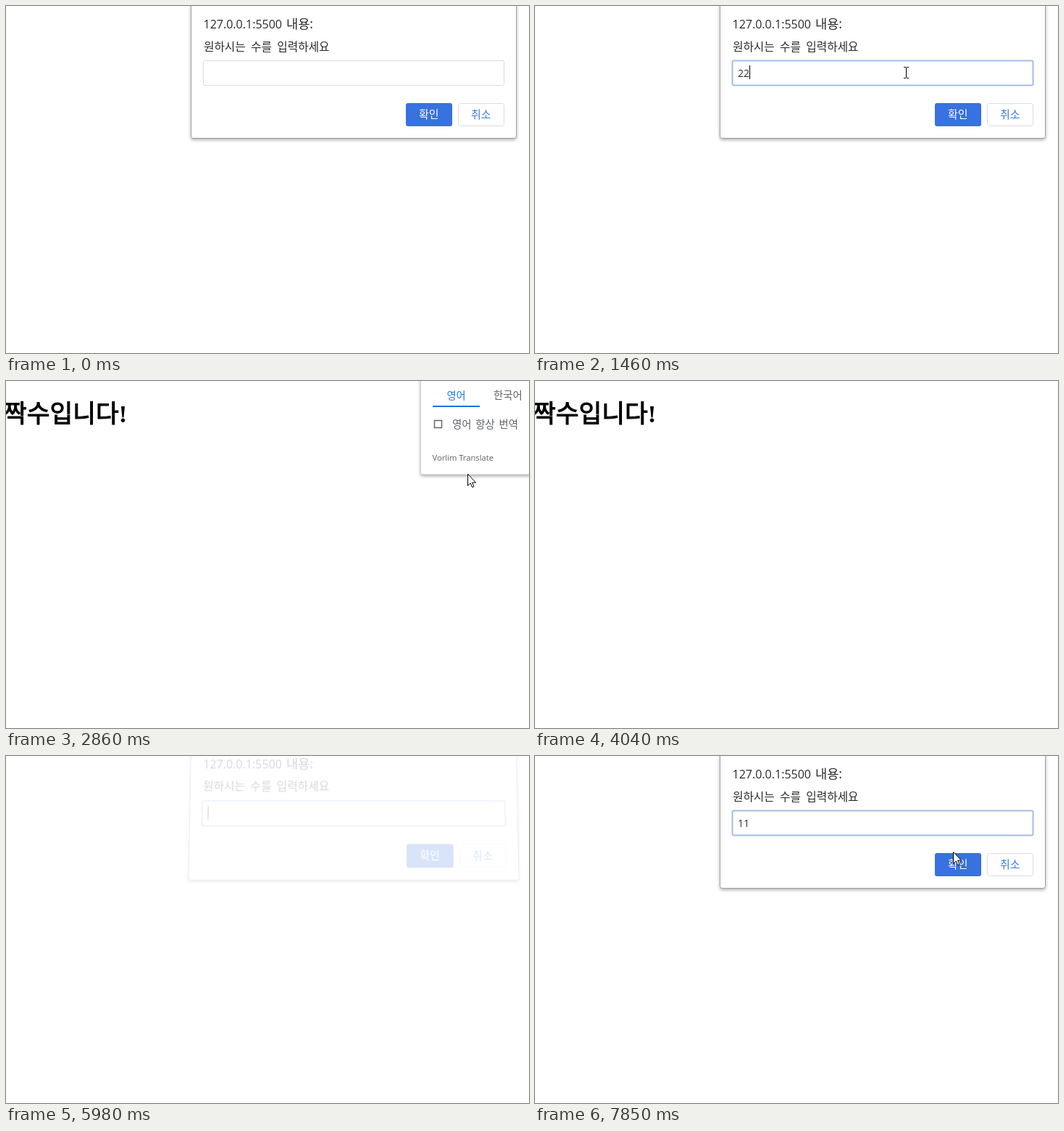
An HTML page that plays this animation: 722 px wide and 479 px high, repeating every 8 s.

```html
<!DOCTYPE html>
<html lang="ko">
<head>
<meta charset="utf-8">
<title>짝수 홀수</title>
<style>
  html, body { margin: 0; width: 100%; height: 100%; overflow: hidden; background: #fff; }
  #stage { position: fixed; inset: 0; overflow: clip; contain: strict; }
  svg { position: absolute; left: 0; top: 0; width: 100%; height: 100%; }
  text { font-family: 'Open Sans', 'Noto Sans CJK KR', 'Noto Sans CJK', sans-serif; fill: #2b2b2b; }
  #heading text { font: 34.5px 'Liberation Serif', 'Noto Sans CJK KR', 'Noto Sans CJK', serif; fill: #000; stroke: #000; stroke-width: 1.1px; }
  #heading tspan { font-weight: 700; stroke: none; }
  #dialog { transform-origin: 480px 12px; }
  .panel { fill: #fff; filter: drop-shadow(0 2px 2px rgba(0, 0, 0, .32)); }
  .button { font-size: 15px; }
  #popup text { fill: #5f6368; }
</style>
</head>
<body>
<div id="stage">
<svg id="heading"><text x="-3" y="57">짝수입니다<tspan>!</tspan></text></svg>

<svg id="dialog">
  <rect class="panel" x="255.5" y="-20" width="449" height="202.5" rx="3" stroke="#a2a2a2"/>
  <text x="272.5" y="31" font-size="16">127.0.0.1:5500</text>
  <text x="387" y="31" font-size="17.6">내용:</text>
  <text x="273" y="61.5" font-size="15.7" word-spacing="3.3">원하시는 수를 입력하세요</text>
  <rect id="field" x="272.5" y="75.5" width="415" height="34" rx="2" fill="#fff"/>
  <text id="value" x="280" y="98" font-size="14"></text>
  <path id="caret" d="M.5 82V101" stroke="#000"/>
  <rect x="552" y="134" width="64" height="32" rx="3" fill="#3871e0"/>
  <text class="button" x="570" y="155" style="fill:#fff">확인</text>
  <rect x="624.5" y="134.5" width="63" height="31" rx="3" fill="#fff" stroke="#dadce0"/>
  <text class="button" x="642" y="155" style="fill:#3c7bdc">취소</text>
</svg>

<svg id="popup">
  <rect class="panel" x="572.5" y="-20" width="160" height="149" rx="3" stroke="#d0d0d0"/>
  <text x="608.5" y="25" font-size="14.2" style="fill:#1a73e8">영어</text>
  <text x="673" y="25" font-size="14.4">한국어</text>
  <path d="M589 35H654" stroke="#1a73e8" stroke-width="2"/>
  <rect x="591.5" y="54.5" width="10" height="10" fill="none" stroke="#5f6368" stroke-width="1.5"/>
  <text x="616" y="65" font-size="14.4" word-spacing="2">영어 항상 번역</text>
  <text x="588.5" y="110" font-size="11.2">Vorlim Translate</text>
</svg>

<svg id="pointer">
  <g id="cursor">
    <path id="arrow" d="M.5 .5V16.5L4.2 13L6.7 18.7L9 17.7L6.6 12.2H11.6Z" fill="#fff" stroke="#000"/>
    <path id="beam" d="M-3 -7.5H0M1 -7.5H4M.5 -7V7M-3 7.5H0M1 7.5H4" fill="none" stroke="#000"/>
  </g>
</svg>
</div>

<script>
const LOOP = 8000, CLOSE = 2240, ANSWER = 2320, DISMISS = 3570, REOPEN = 5980;
const KEY_GAP = 150, BLINK = 500;

// Stops of the pointer: [time, x, y]; it is hidden between visits.
const visits = [
  { until: DISMISS, stops: [[70, 600, 277], [850, 512, 92], [1860, 512, 92], [2200, 573, 145],
    [2700, 573, 145], [3020, 699, 111]] },
  { until: 4040, stops: [[3890, 676, 370], [4040, 685, 479]] },
  { until: 5760, stops: [[4900, 560, 465], [5280, 256, 58], [5660, 717, 444]] },
  { until: LOOP, stops: [[6200, 690, 353], [6520, 448, 117], [6760, 489, 92], [7610, 489, 92],
    [7850, 577, 132]] }
];
const rounds = [
  { digit: '2', focus: 580, type: 1310, end: CLOSE },
  { digit: '1', focus: REOPEN, type: 7060, end: LOOP }
];

const $ = id => document.getElementById(id);
const show = (id, on) => $(id).style.display = on ? '' : 'none';
const ramp = (t, from, to) => Math.min(1, Math.max(0, (t - from) / (to - from)));
const smooth = u => u * u * (3 - 2 * u);
const mix = (a, b, u) => a + (b - a) * u;

function pointerAt(t) {
  const visit = visits.find(v => t >= v.stops[0][0] && t < v.until);
  return visit && visit.stops.reduce(([t0, x0, y0], [t1, x1, y1]) => {
    const u = smooth(ramp(t, t0, t1));
    return [t1, mix(x0, x1, u), mix(y0, y1, u)];
  }).slice(1).map(Math.round);
}

function drawPointer(t, dialogOpen) {
  const spot = pointerAt(t);
  show('pointer', spot);
  if (!spot) return;
  const [x, y] = spot;
  const overField = dialogOpen && x > 272 && x < 688 && y > 75 && y < 110;
  show('arrow', !overField);
  show('beam', overField);
  $('cursor').setAttribute('transform', `translate(${x} ${y})`);
}

// The window leaves upwards while leaning back, and returns the same way.
function dialogPose(t) {
  if (t < REOPEN) {
    const u = ramp(t, CLOSE, CLOSE + 320);
    return [1 - smooth(u), 1 - (1 - u) ** 3.5];
  }
  const u = ramp(t, REOPEN, REOPEN + 180);
  return [mix(.19, 1, u), (1 - u) ** 2];
}

function drawDialog(opacity, tilt) {
  const lean = (-9.3e-5 * tilt).toFixed(8);
  $('dialog').style.opacity = opacity;
  $('dialog').style.transform = tilt
    ? `translateY(${-14 * tilt}px) matrix3d(1,0,0,0, 0,1,0,${lean}, 0,0,1,0, 0,0,0,1)`
    : 'none';
}

function drawField(t) {
  const { digit, focus, type, end } = rounds[t < REOPEN ? 0 : 1];
  const focused = t >= focus && t < end;
  const count = (t >= type) + (t >= type + KEY_GAP);
  const lastAction = count ? type + (count - 1) * KEY_GAP : focus;
  $('value').textContent = digit.repeat(count);
  show('caret', focused && (t - lastAction) % (2 * BLINK) < BLINK);
  $('caret').setAttribute('transform', `translate(${280 + 8 * count} 0)`);
  $('field').setAttribute('stroke', focused ? '#a3bde8' : '#dadada');
  $('field').setAttribute('stroke-width', focused ? 2 : 1);
}

function draw() {
  const t = performance.now() % LOOP;
  const [opacity, tilt] = dialogPose(t);
  show('heading', t >= ANSWER && t < REOPEN);
  $('popup').style.opacity = t < DISMISS ? smooth(ramp(t, CLOSE, CLOSE + 320)) : 0;
  drawDialog(opacity, tilt);
  drawField(t);
  drawPointer(t, opacity === 1);
  requestAnimationFrame(draw);
}
draw();
</script>
</body>
</html>
```
